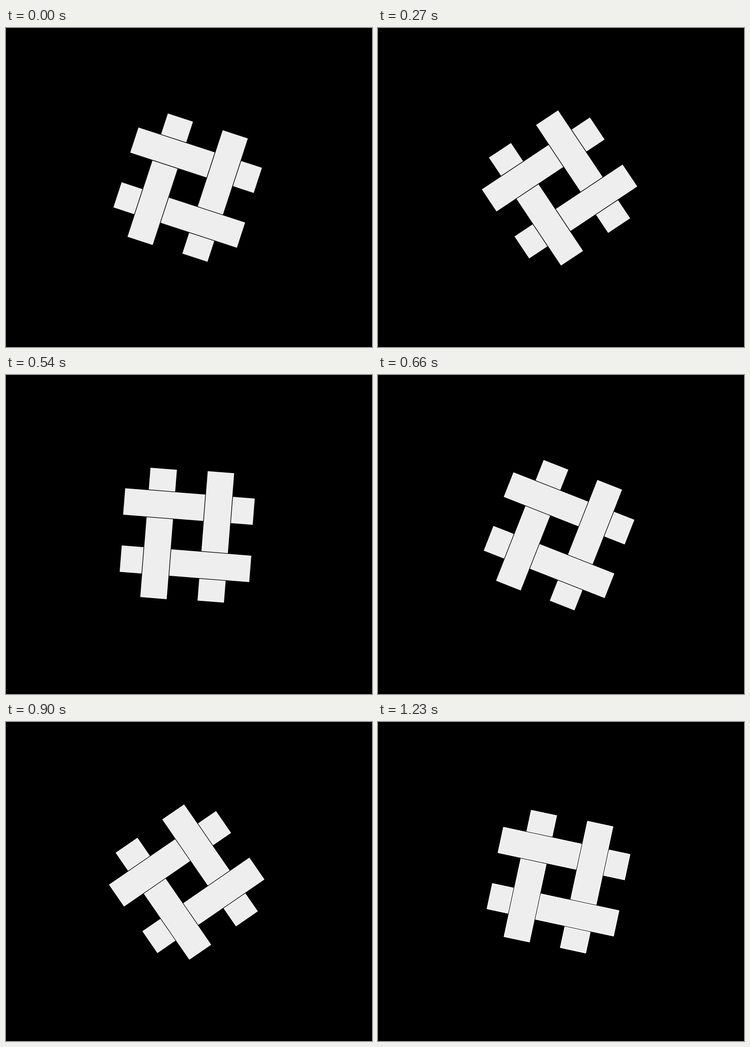
An HTML page with a canvas for the animation above (2.23 s loop, 801x699 px).

```html
<!DOCTYPE html>
<html lang="en">
<head>
<meta charset="utf-8">
<title>Spinning lattice</title>
<style>
  html, body { margin: 0; height: 100%; overflow: hidden; background: #000; }
  canvas { display: block; }
</style>
</head>
<body>
<canvas id="stage" width="801" height="699"></canvas>
<script>
const ctx = document.getElementById('stage').getContext('2d');
const LOOP = 2230, STEP = 30, LAST = 41;
const START = 18.1, TURN = 4.245; // degrees, degrees per step
const RIM = 1.4;

function piece(x, y, w, h, rim) {
  ctx.fillStyle = '#eee';
  ctx.fillRect(x, y, w, h);
  ctx.strokeStyle = `rgba(255,255,255,${rim})`;
  ctx.strokeRect(x + RIM / 2, y + RIM / 2, w - RIM, h - RIM);
}

function draw(step) {
  const rim = (step / LAST) ** 2;
  ctx.resetTransform();
  ctx.fillStyle = '#000';
  ctx.fillRect(0, 0, 801, 699);
  ctx.translate(396.3, 349.7);
  ctx.rotate((START + TURN * step) * Math.PI / 180);
  ctx.translate(1.24, -0.4); // the lattice sits slightly off its pivot
  ctx.lineWidth = RIM;
  for (let i = 0; i < 4; i++) {
    piece(33.8, -143.3, 57.9, 175.6, rim);   // long bar
    piece(-91.7, -141, 57.9, 47.8, rim);     // end of the bar passing beneath
    ctx.rotate(Math.PI / 2);
  }
}

function tick() {
  const t = performance.now() % LOOP;
  draw(Math.min(LAST, Math.floor(t / STEP)));
  requestAnimationFrame(tick);
}
tick();
</script>
</body>
</html>
```
